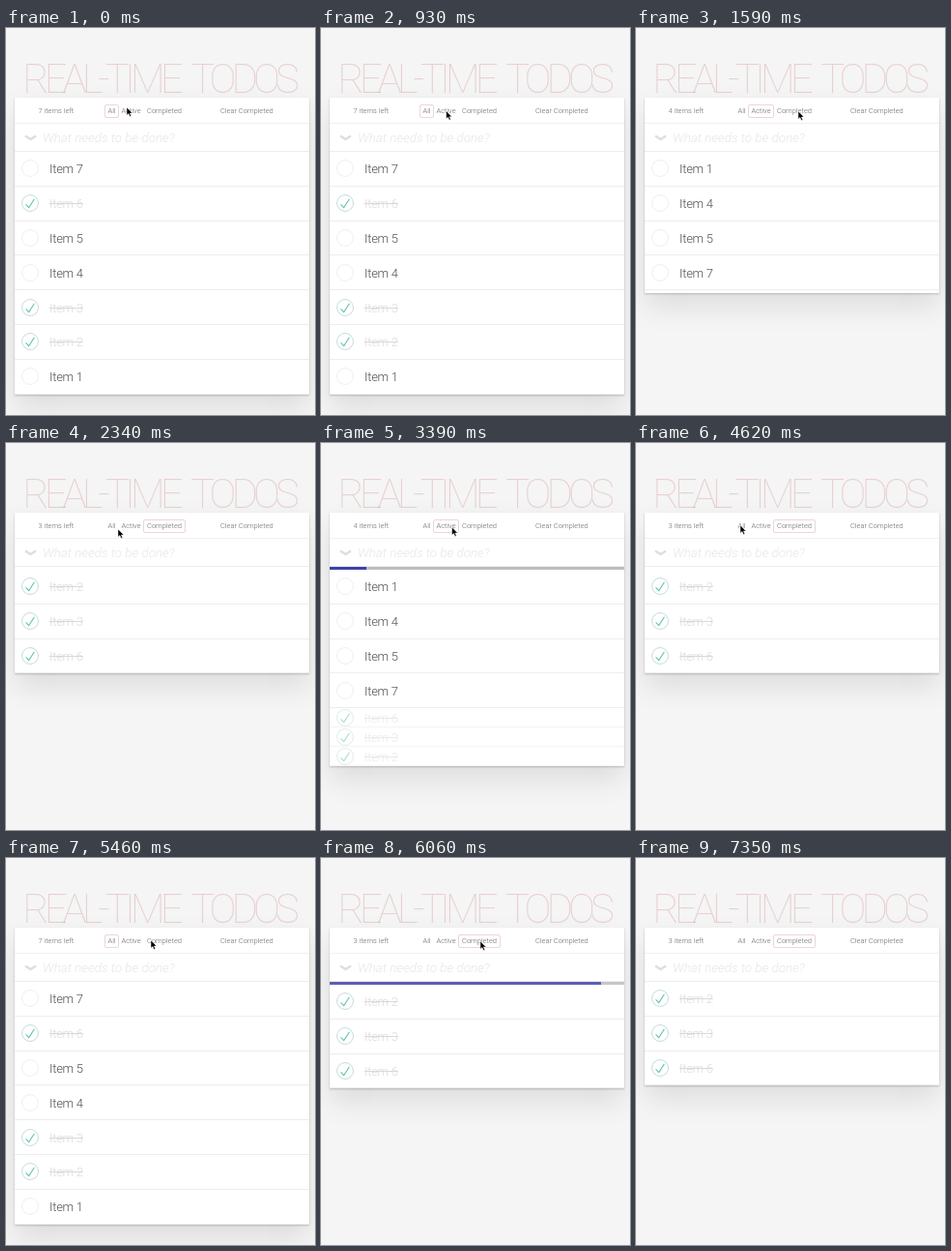
These frames come from a looping animation (320 px wide and 400 px high, 7380 ms). An HTML page:

```html
<!DOCTYPE html>
<html lang="en">
<head>
<meta charset="utf-8">
<title>Real-time todos</title>
<style>
  html, body { margin: 0; width: 100%; height: 100%; overflow: hidden; }
  body { position: relative; background: #f5f5f5; font: 300 13px Roboto, "Liberation Sans", sans-serif; color: #4d4d4d; white-space: nowrap; }
  h1 { position: absolute; left: -2px; top: 28px; width: 320px; margin: 0; text-align: center; font-size: 42px; line-height: 49px; font-weight: 100; letter-spacing: -5px; word-spacing: 8px; color: rgba(175, 47, 47, .18); }
  #card { position: absolute; left: 9px; top: 72px; width: 305px; background: #fff; box-shadow: 0 1px 2px rgba(0, 0, 0, .2), 0 14px 28px rgba(0, 0, 0, .1); }
  #head { position: relative; height: 26px; border-bottom: 1px solid #f1f1f1; font-size: 7.5px; line-height: 14px; color: #666; }
  #head span { position: absolute; top: 7px; }
  #head .tab { box-sizing: border-box; height: 14px; line-height: 12px; text-align: center; border: 1px solid transparent; border-radius: 2px; }
  #head .on { border-color: rgba(175, 47, 47, .2); }
  #entry { position: relative; height: 29px; line-height: 29px; border-bottom: 1px solid #ededed; box-sizing: border-box; }
  #entry svg { position: absolute; left: 10px; top: 11px; }
  #entry i { position: absolute; left: 29px; font-size: 13.4px; color: #e6e6e6; }
  #bar { overflow: hidden; background: #bdbdbd; }
  #fill { height: 3px; background: #3f41a8; }
  #list { display: flex; flex-direction: column; }
  .row { position: relative; overflow: hidden; box-sizing: border-box; border-bottom: 1px solid #ededed; }
  .row svg { position: absolute; left: 7px; top: 50%; margin-top: -9px; }
  .row span { position: absolute; left: 36px; top: 50%; margin-top: -8px; line-height: 18px; letter-spacing: -.25px; }
  .done span { color: #d9d9d9; text-decoration: line-through; }
  #cursor { position: absolute; left: 0; top: 0; overflow: visible; }
</style>
</head>
<body>
<h1>REAL-TIME TODOS</h1>
<div id="card">
  <div id="head">
    <span id="count" style="left:24.5px"></span>
    <span class="tab" style="left:93px;width:15px">All</span>
    <span class="tab" style="left:107px;width:27px">Active</span>
    <span class="tab" style="left:133px;width:44px">Completed</span>
    <span style="left:213px">Clear Completed</span>
  </div>
  <div id="entry">
    <svg width="13" height="8"><path d="M1 1.5L6.5 5L12 1.5" fill="none" stroke="#dedede" stroke-width="2.4"/></svg>
    <i>What needs to be done?</i>
  </div>
  <div id="bar"><div id="fill"></div></div>
  <div id="list"></div>
</div>
<svg id="cursor" width="8" height="11"><path d="M0 0V8.2L1.9 6.5L3.2 9.5L4.7 8.9L3.4 6H6Z" fill="#000" stroke="#fff" stroke-width=".5"/></svg>
<script>
const LOOP = 7380, ROW = 35.8, COLLAPSE = 135;
const $ = id => document.getElementById(id);
const clamp = v => Math.max(0, Math.min(1, v));
const ramp = (t, a, b) => clamp((t - a) / (b - a));
const ease = u => u * u * (3 - 2 * u);

const ALL = 0, ACTIVE = 1, COMPLETED = 2;
const views = [[7, 6, 5, 4, 3, 2, 1], [1, 4, 5, 7], [2, 3, 6]];

// Clicks: time, view, whether it has to load
const clicks = [
  [0, ALL, false], [1465, ACTIVE, false], [1800, COMPLETED, true], [2500, ALL, true],
  [3329, ACTIVE, true], [4080, COMPLETED, true], [4760, ALL, true], [5600, COMPLETED, true]
];

// Pointer stops: time, x, y
const path = [
  [0, 125, 82], [250, 129, 85], [1400, 130, 86], [1590, 168, 86], [1850, 168, 86],
  [2340, 116, 89], [2430, 109, 86], [2700, 109, 86], [3200, 135, 87], [3560, 136, 87],
  [3950, 165, 86], [4150, 165, 86], [4550, 108, 85], [4900, 108, 85], [5460, 150, 85],
  [5560, 163, 86], [6100, 165, 86], [6400, 172, 16], [6430, 174, -14]
];

const circle = color => `<circle cx="50" cy="50" r="47" fill="none" stroke="${color}" stroke-width="5"/>`;
const tick = '<path fill="#5dc2af" d="M72 25L42 71 27 56l-4 4 20 20 34-52z"/>';
const rows = {};
for (let n = 1; n <= 7; n++) {
  const done = views[COMPLETED].includes(n);
  const row = rows[n] = document.createElement('div');
  row.className = done ? 'row done' : 'row';
  row.innerHTML = `<svg width="18" height="18" viewBox="0 0 100 100">${
    done ? circle('#bddad5') + tick : circle('#ededed')}</svg><span>Item ${n}</span>`;
  $('list').append(row);
}
const tabs = document.querySelectorAll('.tab');

function showRow(n, order, scale) {
  const s = rows[n].style;
  s.display = scale > 0 ? 'block' : 'none';
  s.order = order;
  s.height = ROW * scale + 'px';
  s.opacity = scale;
}

function drawList(t) {
  const k = clicks.findLastIndex(c => c[0] <= t);
  const [start, view, loads] = clicks[k];
  const now = views[view], before = k ? views[clicks[k - 1][1]] : now;
  const age = t - start, p = ease(clamp(age / COLLAPSE));

  for (const n in rows) showRow(n, 0, 0);
  now.forEach((n, i) => showRow(n, i, before.includes(n) ? 1 : p));
  before.forEach((n, i) => { if (!now.includes(n)) showRow(n, 10 + i, 1 - p); });

  tabs.forEach((tab, i) => tab.classList.toggle('on', i === view));
  $('count').textContent = now.length + ' items left';

  // Loading bar: fill, fade, then close its gap
  $('bar').style.height = (loads ? 3 * (1 - ramp(age, 560, 590)) : 0) + 'px';
  $('bar').style.opacity = 1 - ramp(age, 450, 520);
  $('fill').style.width = 100 * ramp(age, 0, 500) + '%';
}

function drawCursor(t) {
  const i = path.findLastIndex(p => p[0] <= t);
  const a = path[i], b = path[i + 1] || a;
  const e = a === b ? 0 : ease(ramp(t, a[0], b[0]));
  const at = j => a[j] + (b[j] - a[j]) * e;
  $('cursor').style.transform = `translate(${at(1)}px, ${at(2)}px)`;
}

const origin = performance.now();
function frame() {
  const t = Math.max(0, performance.now() - origin) % LOOP;
  drawList(t);
  drawCursor(t);
  requestAnimationFrame(frame);
}
frame();
</script>
</body>
</html>
```
